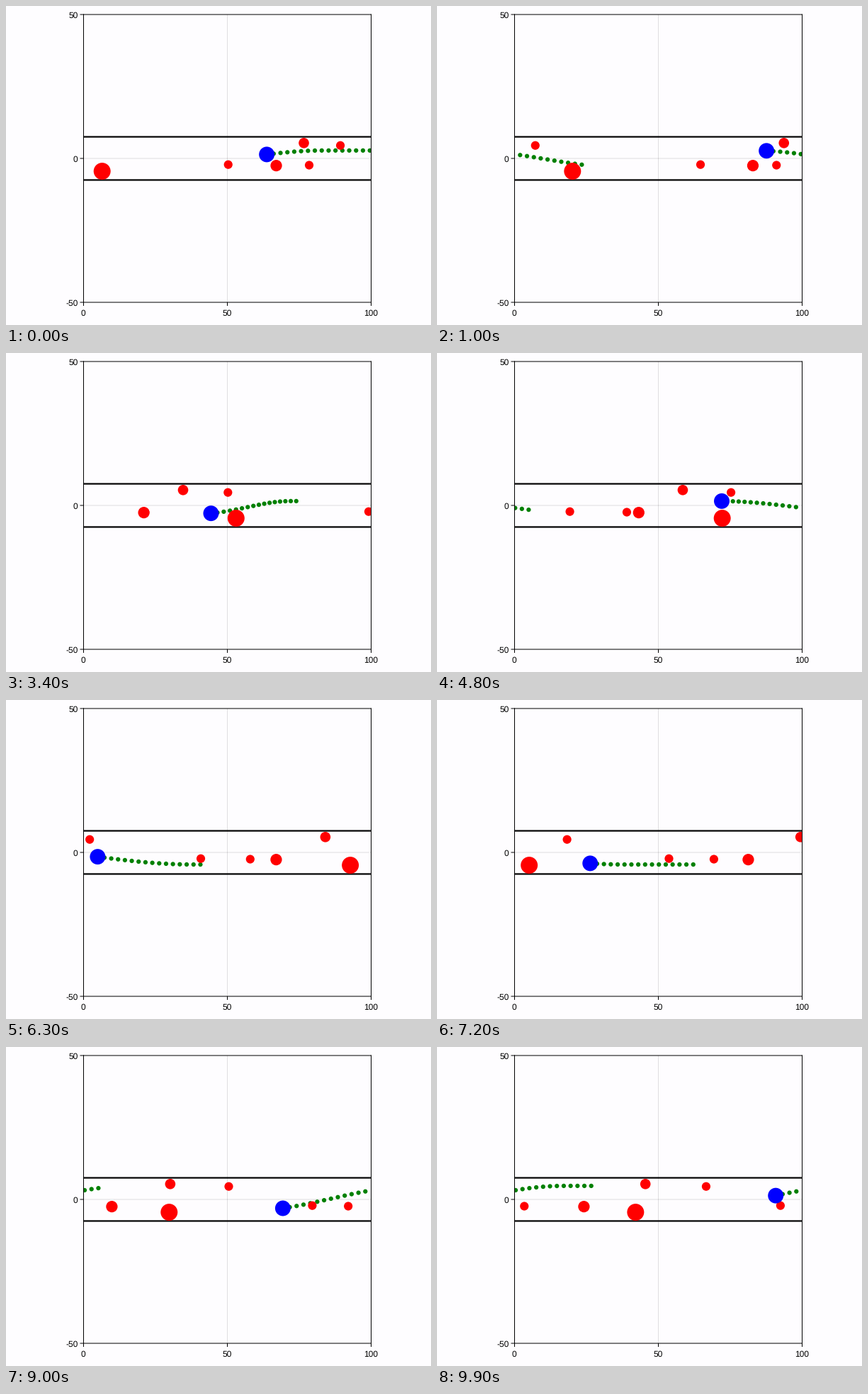
A matplotlib script for the animation above (10 s loop, 600 px wide and 450 px high).

```python
import numpy as np
import matplotlib.pyplot as plt
from matplotlib.animation import FuncAnimation
from matplotlib.patches import Circle

W, H, DPI = 600, 450, 100
FRAMES, STEP_MS = 100, 100
LEFT, BASE, SIDE = 109.5, 32, 406  # plot square in pixels, from lower left
PT = 72 / DPI                      # points per pixel
U = 100 / SIDE                     # road units per pixel
ROAD = 7.5
AHEAD = np.arange(1, 16)

# start x, lane y, radius, speed per frame
CARS = [
    (6.45, -4.45, 2.95, 1.370),
    (50.3, -2.15, 1.5, 1.436),
    (67.0, -2.5, 2.0, 1.587),
    (76.6, 5.35, 1.8, 1.706),
    (78.45, -2.35, 1.5, 1.262),
    (89.3, 4.5, 1.5, 1.791),
]

# swerves of the blue car: time and y of each turning point
TURN_T = np.array([-8, 8, 31, 48, 77, 84, 110])
TURN_Y = np.array([0, 2.75, -3.1, 1.5, -4.2, -4.2, 4.7])


def travel(t):
    """Steady cruise that loses some ground while stuck in traffic."""
    return 63.7 + 2.39 * t - 9.5 / (1 + np.exp((45 - t) / 4.2))


def swerve(now, t):
    """Lateral position at t: finish the swerve under way now, then hold."""
    i = np.searchsorted(TURN_T, now, side="right") - 1
    s = np.clip((t - TURN_T[i]) / (TURN_T[i + 1] - TURN_T[i]), 0, 1)
    ease = (1 - np.cos(np.pi * s)) / 2
    return TURN_Y[i] + (TURN_Y[i + 1] - TURN_Y[i]) * ease


plt.rcParams.update({"path.snap": False, "text.hinting": "none",
                     "font.family": "Liberation Sans", "font.size": 12 * PT})
fig = plt.figure(figsize=(W / DPI, H / DPI), dpi=DPI, facecolor="#fefdff")
ax = fig.add_axes([LEFT / W, BASE / H, SIDE / W, SIDE / H])
ax.set(xlim=(0, 100), ylim=(-50, 50), xticks=[], yticks=[])
ax.patch.set_visible(False)
for spine in ax.spines.values():
    spine.set(linewidth=PT, zorder=8)

for rule in (ax.axvline(50), ax.axhline(0)):
    rule.set(color="black", alpha=0.12, lw=PT, zorder=1)
for y in (-ROAD, ROAD):
    ax.axhline(y, color="black", lw=2.2 * PT, zorder=2)


def tick(xs, ys):
    ax.plot(xs, ys, color="black", lw=PT, clip_on=False,
            solid_capstyle="butt", scalex=False, scaley=False)


for v in (0, 50, 100):
    y = v - 50
    tick([v, v], [-50, -50 - 5 * U])
    tick([-5 * U, 0], [y, y])
    ax.text(v - 0.6 * U, -50 - 18.9 * U, str(v), ha="center")
    ax.text(-8 * U, y - 4.9 * U, str(y), ha="right")


def disc(r, color, z):
    return ax.add_patch(Circle((0, 0), r, fc=color, ec="none", zorder=z))


dots = [disc(0.77, "#008000", 3) for _ in AHEAD]
cars = [disc(r, "#ff0000", 4) for _, _, r, _ in CARS]
ego = disc(2.7, "#0000ff", 5)


def draw(n):
    t = n + AHEAD
    for dot, x, y in zip(dots, travel(t), swerve(n, t)):
        dot.center = x % 100, y
    for car, (x, y, _, speed) in zip(cars, CARS):
        car.center = (x + speed * n) % 100, y
    ego.center = travel(n) % 100, swerve(n, n)
    return [*dots, *cars, ego]


anim = FuncAnimation(fig, draw, frames=FRAMES, interval=STEP_MS,
                     repeat=True, repeat_delay=0)
plt.show()
```
